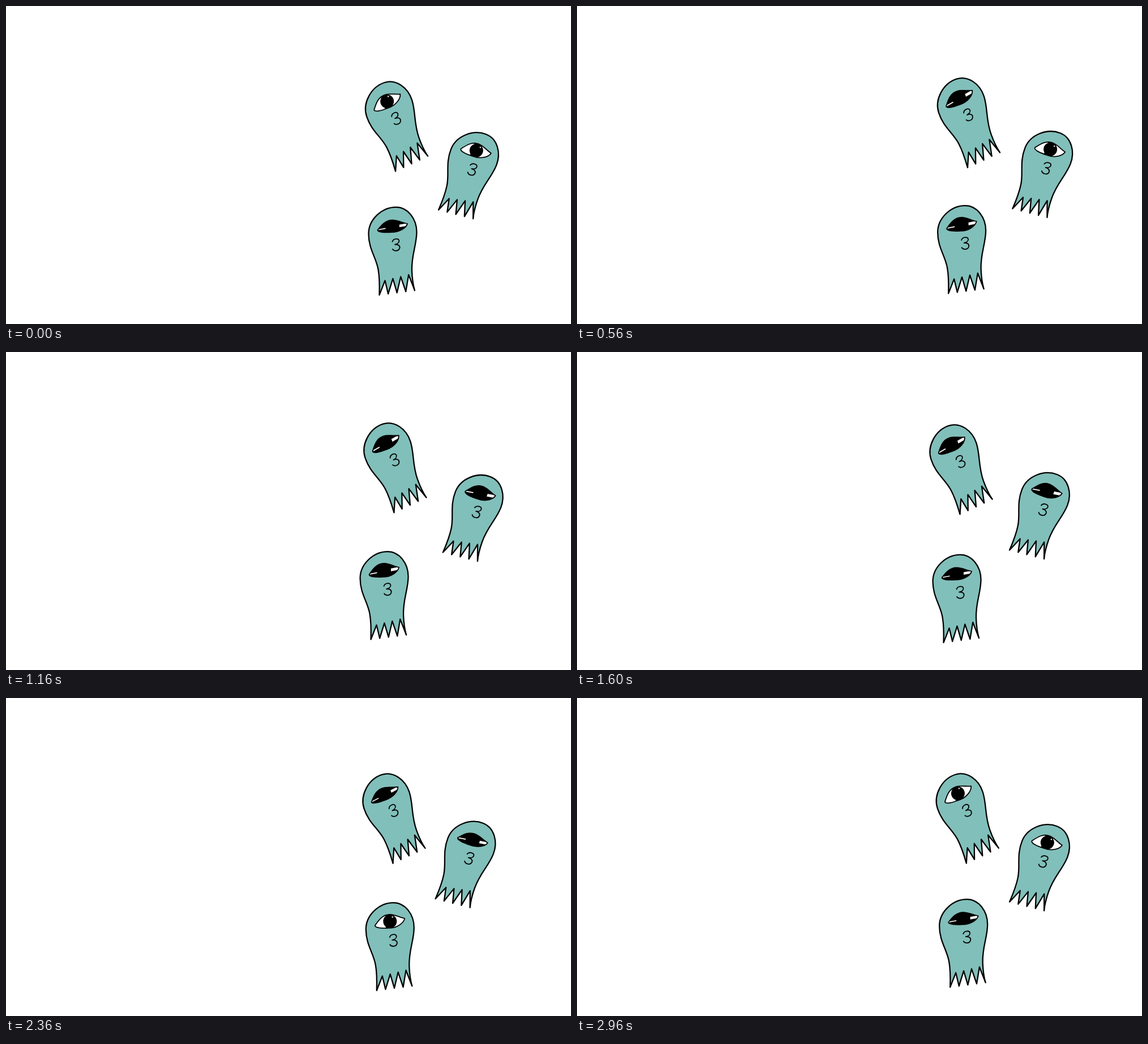
An HTML page with a canvas that plays this animation: 998 px wide and 561 px high, repeating every 3000 ms.

```html
<!DOCTYPE html>
<html>
<head>
<meta charset="utf-8">
<style>
html, body { margin: 0; width: 100%; height: 100%; overflow: hidden; background: #fff; }
canvas { display: block; }
</style>
</head>
<body>
<canvas id="stage" width="998" height="561"></canvas>
<script>
const ctx = document.getElementById('stage').getContext('2d');
const LOOP = 3000, STEP = 40;

// All shapes are relative to the middle of the eye.
const body = new Path2D(`M-22.5 121C-22 105-22 90-24.5 76C-28 55-41.5 40-41.5 13
  C-41.5-12-18-34 7-34C28-34 43.5-13 43.5 10C43.5 33 34 50 35 78C35.5 92 37 103 40 113`);
const almond = new Path2D('M-26 7C-19-3-12-12.5 0-12.5C10-12.5 18-7 26.5-5.5C25 2 14 11.5-2 11.5C-12 12-26 12-26 7Z');
const mouth = new Path2D('M.5 27C2 21.5 11.5 20 12.5 25.5C12.5 29.5 8 31.5 5 32C10 31.5 14.5 33.5 13.5 38C12 44.5 3 44 1 40');

// Jagged hem: evenly spaced notches and tips, right to left
for (let i = 3; i >= 0; i--) {
  body.lineTo(-12.5 + 13.9 * i, 95.5 - 3.4 * i);
  body.lineTo(-22.5 + 15.6 * i, 121 - 2 * i);
}
body.closePath();

// path: drift as [time, dx, dy]; the eye is open around `open` for `span` ms on each side
const ghosts = [
  { x: 672.5, y: 169.5, turn: -17.8, open: 2860, span: 480,
    path: [[0, 0, 0], [880, 3, -10], [1720, -14, -4.3], [2400, -4, .5]] },
  { x: 829.5, y: 255.5, turn: 21.6, open: 3100, span: 600,
    path: [[170, 0, 0], [980, 11, -4.5], [1720, -2.2, -11.3], [2360, -5.5, -5.5], [2800, 0, 0]] },
  { x: 683.5, y: 389.3, turn: 0, open: 2300, span: 600,
    path: [[280, .5, -3.2], [1208, -17.4, -3.2], [1680, -12.7, 3.4], [2270, -6.9, 6.6]] }
];

const mix = (a, b, k) => a + (b - a) * k;
const clamp = v => Math.max(0, Math.min(1, v));

// Straight lines between the points of a closed path
function drift(path, t) {
  const next = path.findIndex(p => p[0] > t);
  const b = path[Math.max(0, next)], a = path.at(next > 0 ? next - 1 : -1);
  const k = (t - a[0] + LOOP) % LOOP / ((b[0] - a[0] + LOOP) % LOOP);
  return [mix(a[1], b[1], k), mix(a[2], b[2], k)];
}

function stroke(path, width) {
  ctx.lineWidth = width;
  ctx.stroke(path);
}

function dot(x, y, r, color) {
  ctx.fillStyle = color;
  ctx.beginPath();
  ctx.arc(x, y, r, 0, Math.PI * 2);
  ctx.fill();
}

// The white on one side of the pupil, a slanted band that narrows to a sliver
function drawWhite(side, open) {
  const inner = side * mix(12, 7, open), outer = side * 28;
  const half = mix(1.7 + .8 * side, 13, open);
  const axis = x => 1.5 - .2 * x;
  ctx.fillStyle = '#fff';
  ctx.beginPath();
  ctx.moveTo(inner, axis(inner) - half);
  ctx.lineTo(outer, axis(outer) - half);
  ctx.lineTo(outer, axis(outer) + half);
  ctx.lineTo(inner, axis(inner) + half);
  ctx.fill();
}

function drawEye(open, squint) {
  ctx.save();
  ctx.translate(.5, -.7 + squint * 8);
  ctx.scale(1, 1 - squint);
  ctx.fillStyle = '#000';
  ctx.fill(almond);
  ctx.save();
  ctx.clip(almond);
  drawWhite(-1, open);
  drawWhite(1, open);
  dot(.5, -.3, 12, '#000');
  if (open > .6) dot(5, -8, 1.2, '#fff');
  ctx.restore();
  stroke(almond, 1.8);
  ctx.restore();
}

function drawGhost(g, t) {
  const [dx, dy] = drift(g.path, t);
  const away = Math.abs((t - g.open + LOOP * 2.5) % LOOP - LOOP / 2);
  const open = clamp((g.span - away) / 120);
  const squint = away > g.span && away < g.span + 160 ? .1 : 0;
  ctx.save();
  ctx.translate(g.x + dx, g.y + dy);
  ctx.rotate(g.turn * Math.PI / 180);
  ctx.fillStyle = '#81bfba';
  ctx.fill(body);
  stroke(body, 2.3);
  stroke(mouth, 1.8);
  drawEye(open, squint);
  ctx.restore();
}

function frame() {
  const t = Math.floor(performance.now() % LOOP / STEP) * STEP;
  ctx.clearRect(0, 0, 998, 561);
  ctx.lineJoin = ctx.lineCap = 'round';
  ghosts.forEach(g => drawGhost(g, t));
  requestAnimationFrame(frame);
}
frame();
</script>
</body>
</html>
```
